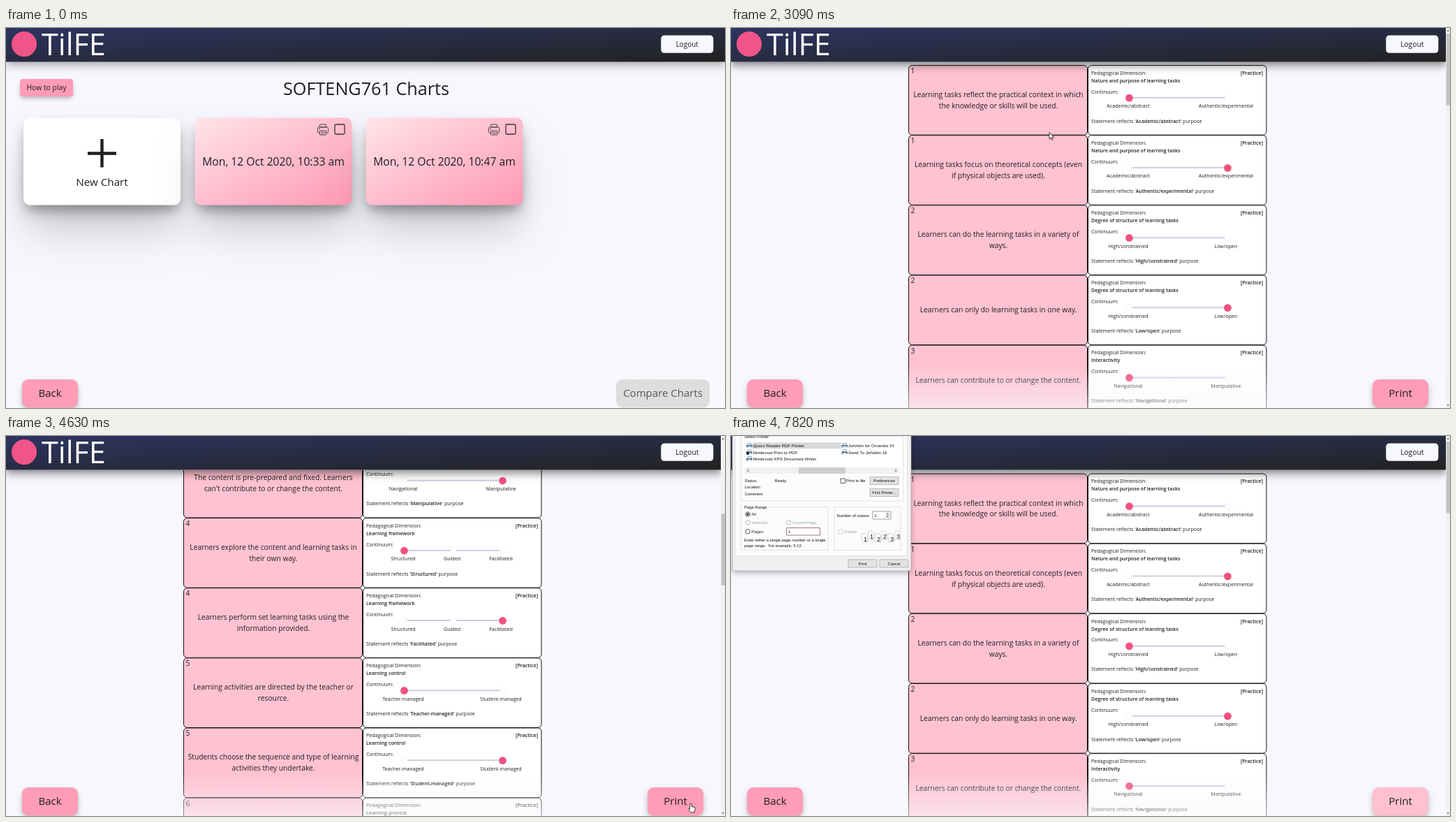
An HTML page with a canvas that plays this animation: 1030 px wide and 544 px high, repeating every 7900 ms.

```html
<!DOCTYPE html>
<html lang="en">
<head>
<meta charset="utf-8">
<title>Charts</title>
<style>
html, body { margin: 0; width: 100%; height: 100%; overflow: hidden; background: #f7f8fd; }
canvas { display: block; }
</style>
</head>
<body>
<canvas id="stage" width="1030" height="544"></canvas>
<script>
const W = 1030, H = 544, LOOP = 7900;
const stage = document.getElementById('stage').getContext('2d');
const layer = Object.assign(document.createElement('canvas'), { width: 300, height: 240 }).getContext('2d');
let ctx = stage;

const PAGE = '#f7f8fd', INK = '#1f1f22', PINK = '#ff9cb7', PALE = '#ffc2d2';
const SANS = '"Open Sans", "Noto Sans", sans-serif';
const DIALOG = '"Liberation Sans", Arial, sans-serif';

// Each dimension: title, continuum labels, statement per end
const dims = [
  ['Nature and purpose of learning tasks', ['Academic/abstract', 'Authentic/experimental'],
    ['Learning tasks reflect the practical context in which|the knowledge or skills will be used.',
     'Learning tasks focus on theoretical concepts (even|if physical objects are used).']],
  ['Degree of structure of learning tasks', ['High/constrained', 'Low/open'],
    ['Learners can do the learning tasks in a variety of|ways.', 'Learners can only do learning tasks in one way.']],
  ['Interactivity', ['Navigational', 'Manipulative'],
    ['Learners can contribute to or change the content.',
     "The content is pre-prepared and fixed. Learners|can't contribute to or change the content."]],
  ['Learning framework', ['Structured', 'Guided', 'Facilitated'],
    ['Learners explore the content and learning tasks in|their own way.',
     'Learners perform set learning tasks using the|information provided.']],
  ['Learning control', ['Teacher-managed', 'Student-managed'],
    ['Learning activities are directed by the teacher or|resource.',
     'Students choose the sequence and type of learning|activities they undertake.']],
  ['Learning process', ['', ''], ['']]
];

const clamp = v => Math.max(0, Math.min(1, v));
const smooth = p => p * p * (3 - 2 * p);
const mix = (a, b, p) => a + (b - a) * p;

// Value of a keyed track [[time, ...values]] at time t
function track(keys, t, ease = p => p) {
  let i = 0;
  while (i < keys.length - 2 && t >= keys[i + 1][0]) i++;
  const [t0, ...a] = keys[i], [t1, ...b] = keys[i + 1];
  const p = ease(clamp((t - t0) / (t1 - t0)));
  return a.map((v, k) => mix(v, b[k], p));
}

const scrollKeys = [[3090, 0], [3800, 376.4], [4100, 537.4]];
const listPath = [[290, 757, 522], [880, 478, 148.5], [940, 478, 148], [1070, 446, 131.5], [1310, 446, 132],
  [1460, 452, 140], [1610, 449, 134], [2090, 451, 134], [2240, 452, 136]];
const printPath = [[2240, 453, 140], [2390, 456, 149.5], [3090, 456, 149.5], [3800, 515, 344.5], [4080, 517, 346],
  [4630, 981, 526], [5940, 979, 526], [6750, 979, 526], [6880, 981, 544]];

function text(s, x, y, size, o = {}) {
  ctx.font = `${o.weight || 400} ${size}px ${o.font || SANS}`;
  ctx.textAlign = o.align || 'left';
  ctx.fillStyle = o.color || INK;
  ctx.fillText(s, x, y + size * 0.36);
  return ctx.measureText(s).width;
}
const center = (s, x, y, size, color) => text(s, x, y, size, { align: 'center', color });

function path(x, y, w, h, r = 0) {
  ctx.beginPath();
  ctx.roundRect(x, y, w, h, r);
}
function box(x, y, w, h, r, fill, stroke, line = 1) {
  path(x, y, w, h, r);
  if (fill) { ctx.fillStyle = fill; ctx.fill(); }
  if (stroke) { ctx.strokeStyle = stroke; ctx.lineWidth = line; ctx.stroke(); }
}
function poly(pts, fill, stroke, line = 1) {
  ctx.beginPath();
  pts.forEach(([x, y]) => ctx.lineTo(x, y));
  if (fill) { ctx.closePath(); ctx.fillStyle = fill; ctx.fill(); }
  if (stroke) { ctx.strokeStyle = stroke; ctx.lineWidth = line; ctx.stroke(); }
}
function dot(x, y, r, fill, stroke, line = 1) {
  box(x - r, y - r, r * 2, r * 2, r, fill, stroke, line);
}
function shadow(x, y, w, h, r, dy, blur, alpha) {
  ctx.save();
  ctx.shadowColor = `rgba(0,0,0,${alpha})`;
  ctx.shadowBlur = blur;
  ctx.shadowOffsetY = dy;
  box(x, y, w, h, r, '#fff');
  ctx.restore();
}
// Corner to corner gradient with the CSS "to bottom right" slope
function diagonal(x, y, w, h, from, to) {
  const k = w * h / (w * w + h * h), cx = x + w / 2, cy = y + h / 2;
  const g = ctx.createLinearGradient(cx - h * k, cy - w * k, cx + h * k, cy + w * k);
  g.addColorStop(0, from);
  g.addColorStop(1, to);
  return g;
}

function header(w, depth, size) {
  shadow(0, 0, w, 48.5, 0, 4, 12, depth);
  box(0, 0, w, 48.5, 0, diagonal(0, 0, w, 48.5, '#2d3561', '#222222'));
  dot(26, 23, 18, '#f0558a');
  text('TilFE', 51, 24, 43, { color: '#fff' });
  box(938.3, 10.6, 75, 25.2, 4.5, PAGE);
  center('Logout', 975.7, 23, size);
}

function button(label, x, w, fill) {
  shadow(x + 1, 504, w - 2, 38, 8, 4, 9, 0.32);
  box(x, 503, w, 40.5, 9, fill);
  center(label, x + w / 2, 523, 15);
}

function bottomFade() {
  const g = ctx.createLinearGradient(0, 483, 0, H);
  g.addColorStop(0, 'rgba(248,248,253,0)');
  g.addColorStop(1, 'rgba(248,248,253,.58)');
  ctx.fillStyle = g;
  ctx.fillRect(0, 483, W, H - 483);
}

function printerIcon(x, y) {
  const c = '#4a4045';
  box(x + 3.5, y + 0.5, 9, 4, 0.5, null, c);
  box(x + 0.5, y + 4.5, 15, 8, 1.5, null, c);
  box(x + 3.5, y + 9.5, 9, 6, 0.5, '#ffc8d6', c);
  poly([[x + 5, y + 11.5], [x + 11, y + 11.5]], null, c, 0.8);
  poly([[x + 5, y + 13.5], [x + 11, y + 13.5]], null, c, 0.8);
  poly([[x + 2, y + 7], [x + 4, y + 7]], null, c);
}

function card(x, fill, shade) {
  shadow(x + 7, 136, 211, 111, 9, 40, 56, 0.2);
  shadow(x + 3, 132, 219, 119, 9, 10, 18, 0.36);
  box(x, 128.5, 225, 125, 9, fill);
  if (shade) box(x, 128.5, 225, 125, 9, `rgba(0,0,0,${0.1 * shade})`);
}

function chartCard(x, when, shade) {
  card(x, diagonal(x, 128.5, 225, 125, '#ffe4ea', '#ff98b4'), shade);
  printerIcon(x + 175.5, 137.5);
  box(x + 200.5, 138, 14, 14, 1.5, null, '#3a3236', 1.3);
  center(when, x + 112.5, 191, 15.7);
}

const inCard = (p, x) => p[0] >= x && p[0] < x + 225 && p[1] > 129 && p[1] < 254;

function listPage(t) {
  const pos = track(listPath, t, smooth);
  const before = track(listPath, t - 80, smooth);
  const shade = x => (inCard(pos, x) + inCard(before, x)) / 2;

  text('SOFTENG761 Charts', 516, 87, 25.2, { align: 'center' });
  shadow(21, 75, 74, 22, 4, 3, 6, 0.3);
  box(20, 73, 76, 25, 4, PINK);
  center('How to play', 58, 85.5, 10.4);

  card(25, '#fff', 0);
  poly([[117, 179.5], [158, 179.5]], null, INK, 4.4);
  poly([[137.5, 159], [137.5, 199.5]], null, INK, 4.4);
  center('New Chart', 137.5, 221, 15.2);
  chartCard(270.5, 'Mon, 12 Oct 2020, 10:33 am', shade(270.5));
  chartCard(515.5, 'Mon, 12 Oct 2020, 10:47 am', shade(515.5));

  bottomFade();
  button('Back', 23, 80, PINK);
  box(874, 503, 134, 40.5, 9, '#dcdedd');
  center('Compare Charts', 941, 523, 15, '#58585b');
  header(W, 0.32, 9.9);
  if (t >= 290) cursor(pos, inCard(pos, 270.5) || inCard(pos, 515.5));
}

function row(n, y) {
  const [title, labels, says] = dims[n >> 1];
  const end = n % 2, size = 7.1, bold = { weight: 600 };
  box(254.5, y, 256, 99.7, 5, PALE, '#111');
  box(511.5, y, 255.5, 99.7, 5, '#fff', '#111');

  text(String((n >> 1) + 1), 257.5, y + 7.8, 10.4);
  const lines = (says[end] || '').split('|');
  lines.forEach((s, i) => center(s, 383, y + 49.8 + (i - (lines.length - 1) / 2) * 15.9, 10.25));

  text('Pedagogical Dimension:', 516, y + 10.7, size);
  text('[Practice]', 762, y + 10.7, size, { weight: 600, align: 'right' });
  text(title, 516, y + 21.7, size, bold);
  text('Continuum:', 516, y + 37.5, size);

  const ty = y + 46.7, last = labels.length - 1;
  poly([[575, ty - 0.3], [708, ty - 0.3]], null, '#cbd0df', 2);
  labels.forEach((s, i) => {
    const x = 570.5 + 141 * i / last;
    if (last > 1 && i === 1) box(x - 4, ty - 2, 8, 4, 0, '#fff');
    if (i === end * last) dot(x, ty, 5.4, '#f0527f');
    else dot(x, ty, 4, '#fff', '#f1f1f5', 0.8);
    center(s, 569 + 140 * i / last, y + 58.3, size);
  });

  let x = 516;
  x += text("Statement reflects '", x, y + 79.5, size);
  x += text(labels[end * last], x, y + 79.5, size, bold);
  text("' purpose", x, y + 79.5, size);
}

function printPage(t) {
  const y0 = t < 5400 ? track(scrollKeys, t)[0] : 0;
  for (let n = 0; n < 11; n++) {
    const y = 54 + n * 100.15 - y0;
    if (y > -60 && y < H) row(n, y);
  }
  bottomFade();
  button('Back', 23, 80, PINK);
  const p = clamp((t - 4740) / 200);
  button('Print', 919, 80, `rgb(255,${mix(156, 192, p)},${mix(183, 208, p)})`);
  header(1024, 0.5, 10.3);

  box(1024, 0, 6, H, 0, '#f1f1f1');
  box(1024.5, 8 + y0 * 0.192, 5.5, 102.5, 0, '#c3c3c3');
  poly([[1025.3, 5], [1027.2, 2.5], [1029, 5]], '#777');
  poly([[1025.3, 539], [1027.2, 541.5], [1029, 539]], '#777');

  if (t >= 5940) showDialog(t);
  if (t < 6880) {
    const pos = track(printPath, t, smooth);
    cursor(pos, t < 5940 && pos[0] > 919 && pos[1] > 503);
  }
}

const label = (s, x, y, color = '#111', size = 5.85) => text(s, x, y, size, { color, font: DIALOG });

function group(x, y, w, h, name) {
  box(x, y, w, h, 0, null, '#dcdcdc', 0.8);
  if (!name) return;
  box(x + 4, y - 3, 36, 6, 0, '#fcfcfc');
  label(name, x + 5, y);
}
function push(name, x, y, active) {
  box(x, y, 41, 11, 0, '#e3e3e3', active ? '#0078d7' : '#ababab', active ? 1.2 : 0.8);
  text(name, x + 20.5, y + 5.5, 5.8, { align: 'center', color: '#111', font: DIALOG });
}
function radio(name, x, y, on, color) {
  dot(x, y, 3.2, '#fff', color, 0.8);
  if (on) dot(x, y, 1.7, '#222');
  label(name, x + 5.3, y, color);
}
function device(name, x, y, main) {
  box(x + 2, y - 3.4, 5, 3, 0, '#fff', '#6d8090', 0.7);
  box(x, y - 1, 8.5, 3.5, 0.8, '#56748c');
  box(x + 2, y + 0.8, 5, 2.2, 0, '#d9ecf7');
  if (main) dot(x + 2, y + 1.5, 2.3, '#222');
  label(name, x + 9.5, y + 0.2, '#111', 6.25);
}
function sheets(n, x) {
  [[9, 136], [0, 139.5]].forEach(([dx, y]) => {
    const l = x + dx;
    poly([[l, y], [l + 5, y], [l + 8, y + 3], [l + 8, y + 12.5], [l, y + 12.5], [l, y]], '#fff', '#c4c4c4', 0.7);
    label(n, l + 2.5, y + 8, '#111', 9);
  });
}

function dialog(focus) {
  shadow(2, -70, 256, 263, 0, 3, focus ? 14 : 8, focus ? 0.4 : 0.28);
  box(2, -70, 256, 263, 0, '#f0f0f0', '#a8a8a8', 0.7);
  box(6, -60, 246.5, 231.5, 0, '#fcfcfc', '#dcdcdc', 0.8);

  group(14, 1, 233, 92, 'Select Printer');
  box(19.5, 7.5, 222, 47.5, 0, '#fff');
  box(31, 9.3, 127, 9, 0, focus ? '#cce4f7' : '#d9d9d9');
  device('Quorv Reader PDF Printer', 22, 13.8);
  device('Nimbrosol Print to PDF', 22, 23.2, true);
  device('Nimbrosol XPS Document Writer', 22, 32.7);
  ctx.save();
  path(157, 8, 84.5, 40);
  ctx.clip();
  device('JotVelm for Orvanda 10', 158.5, 13.8);
  device('Send To JotVelm 16', 158.5, 23.2);
  ctx.restore();
  box(19.5, 45, 222, 9, 0, '#f0f0f0');
  box(97, 45, 67, 9, 0, '#cdcdcd');
  poly([[25.5, 47.5], [23.5, 49.5], [25.5, 51.5]], null, '#444');
  poly([[235, 47.5], [237, 49.5], [235, 51.5]], null, '#444');

  label('Status:', 19.5, 64);
  label('Ready', 62.5, 64);
  label('Location:', 19.5, 73.3);
  label('Comment:', 19.5, 83);
  box(157, 61, 6.4, 6.4, 0, '#fff', '#333', 0.8);
  label('Print to file', 165, 64);
  push('Preferences', 199, 58.5);
  push('Find Printer...', 199, 75.5);

  group(14, 101.5, 125, 62, 'Page Range');
  radio('All', 24, 112, true, '#222');
  radio('Selection', 24, 124, false, '#a0a0a0');
  radio('Current Page', 82.5, 124, false, '#a0a0a0');
  radio('Pages:', 24, 136.8, false, '#222');
  box(79.5, 131.5, 48, 10.5, 0, '#fff', '#8b6a70', 0.9);
  label('1', 82, 136.8);
  label('Enter either a single page number or a single', 19, 149.2);
  label('page range.  For example, 5-12', 19, 156.6);

  group(148, 101.5, 95, 62);
  label('Number of copies:', 151.5, 113.5);
  box(203, 108, 26, 11, 0, '#fff', '#8a8a8a', 0.8);
  box(220.5, 109, 7.5, 9, 0, '#ececec');
  poly([[222.7, 112.5], [224.3, 110.5], [226, 112.5]], '#555');
  poly([[222.7, 114.5], [224.3, 116.5], [226, 114.5]], '#555');
  label('1', 205.5, 113.5);
  box(153.5, 133.8, 6.2, 6.2, 0, '#fff', '#c4c4c4', 0.8);
  label('Collate', 162, 137, '#a0a0a0');
  ['1', '2', '3'].forEach((n, i) => sheets(n, 187.5 + 19 * i));

  push('Print', 168, 177, focus);
  push('Cancel', 213, 177);
}

// Fades the dialog in as one layer while it grows around its middle
function showDialog(t) {
  const p = clamp((t - 5940) / 390);
  const s = mix(0.9, 1, 1 - (1 - p) ** 2);
  ctx = layer;
  ctx.clearRect(0, 0, 300, 240);
  ctx.save();
  ctx.translate(127, 61);
  ctx.scale(s, s);
  ctx.translate(-127, -61);
  dialog(t < 7820);
  ctx.restore();

  ctx = stage;
  ctx.globalAlpha = p;
  ctx.drawImage(layer.canvas, 0, 0);
  ctx.globalAlpha = 1;
}

function cursor([x, y], hand) {
  ctx.save();
  ctx.translate(x, y);
  ctx.lineJoin = 'round';
  if (hand) {
    ctx.beginPath();
    ctx.moveTo(-1.2, 8);
    ctx.lineTo(-1.2, 1);
    ctx.quadraticCurveTo(0, -0.8, 1.2, 1);
    ctx.lineTo(1.2, 4.6);
    ctx.lineTo(5.2, 5.3);
    ctx.quadraticCurveTo(6.6, 5.7, 6.4, 7.4);
    ctx.lineTo(5, 12.7);
    ctx.lineTo(-0.2, 12.7);
    ctx.lineTo(-3.2, 8.4);
    ctx.quadraticCurveTo(-3.3, 6.3, -1.2, 8);
    ctx.fillStyle = '#fff';
    ctx.fill();
    ctx.strokeStyle = '#222';
    ctx.lineWidth = 0.9;
    ctx.stroke();
  } else {
    poly([[0, 0], [0, 9.4], [2.1, 7.5], [3.6, 10.8], [5, 10.2], [3.6, 7], [6.5, 6.8], [0, 0]], '#fff', '#222', 0.9);
  }
  ctx.restore();
}

const start = performance.now();
function frame() {
  const t = (performance.now() - start) % LOOP;
  ctx.fillStyle = PAGE;
  ctx.fillRect(0, 0, W, H);
  (t < 2240 ? listPage : printPage)(t);
  requestAnimationFrame(frame);
}
frame();
</script>
</body>
</html>
```
